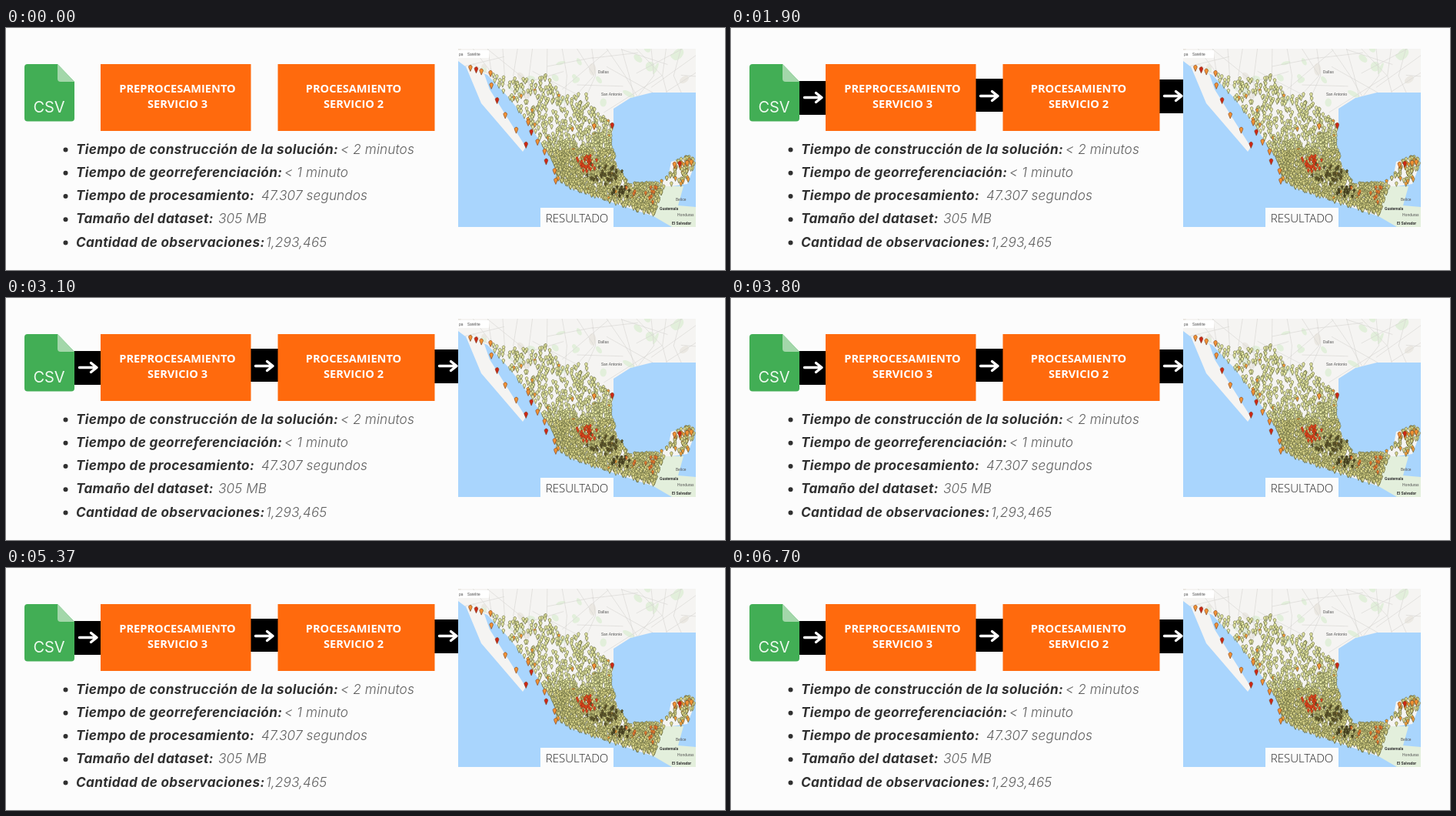
Write an HTML page with a canvas that moves like this. It is 935 px wide and 315 px high and loops after 6.86 s.

```html
<!DOCTYPE html>
<html lang="es">
<head>
<meta charset="utf-8">
<style>
  html, body { margin: 0; width: 100%; height: 100%; overflow: hidden; background: #fcfcfc; }
  canvas { position: absolute; left: 588px; top: 27px; }
  svg { position: absolute; left: 0; top: 0; }
  .box { fill: #ff6a0d; }
  .step { font: 700 14.6px "Open Sans", sans-serif; fill: #fff; text-anchor: middle; }
  .key { font: italic 700 17.2px Inter, sans-serif; letter-spacing: .3px; fill: #303030; }
  .value { font: italic 300 17.2px Inter, sans-serif; letter-spacing: .1px; fill: #606060; }
  .csv { font: 400 20px Inter, sans-serif; fill: #effaf0; text-anchor: middle; }
  .result { font: 300 15px "Open Sans", sans-serif; fill: #222; text-anchor: middle; }
  .head { fill: none; stroke: #fff; stroke-width: 3.4; stroke-linecap: round; stroke-linejoin: round; }
  .arrows { animation: reveal 6860ms step-end infinite; }
  @keyframes reveal { 0% { visibility: hidden; } 1.0204%, 100% { visibility: visible; } }
</style>
</head>
<body>
<canvas id="map" width="309" height="232"></canvas>
<svg width="935" height="315" viewBox="0 0 935 315">
  <defs><path id="arrow" class="head" d="M1 0H23.500M16-6 23.500 0 16 6"/></defs>

  <g class="arrows">
    <path d="M88 69h36v44H88zM318 66h37v43h-37zM557 67h31v44h-31z"/>
    <use href="#arrow" x="94.500" y="90.500"/>
    <use href="#arrow" x="323.500" y="88.500"/>
    <use href="#arrow" x="562.500" y="88.500"/>
  </g>

  <path d="M28 47H67L89 70V117.500Q89 121.500 85 121.500H28Q24 121.500 24 117.500V51Q24 47 28 47Z" fill="#42ae55"/>
  <path d="M67 47 89 70H71Q67 70 67 66Z" fill="#a3d7aa"/>
  <text class="csv" x="56" y="110">CSV</text>

  <path class="box" d="M123 47h195.500v87H123zM353.500 47h204v87h-204z"/>
  <g class="step">
    <text x="223" y="84">PREPROCESAMIENTO</text>
    <text x="223" y="104">SERVICIO 3</text>
    <text x="452" y="84">PROCESAMIENTO</text>
    <text x="452" y="104">SERVICIO 2</text>
  </g>

  <g id="facts"></g>

  <path d="M695 234h95v26h-95z" fill="#fcfcfc"/>
  <text class="result" x="742.500" y="253">RESULTADO</text>
</svg>
<script>
const facts = [
  ['Tiempo de construcción de la solución:', '&lt; 2 minutos', 435],
  ['Tiempo de georreferenciación:', '&lt; 1 minuto', 362],
  ['Tiempo de procesamiento:', '47.307 segundos', 332],
  ['Tamaño del dataset:', '305 MB', 276],
  ['Cantidad de observaciones:', '1,293,465', 338],
];
document.getElementById('facts').innerHTML = facts.map(([key, value, x], i) => {
  const y = 163.5 + i * 30.25;
  return `<circle cx="77.5" cy="${y - 5}" r="3" fill="#303030"/>
    <text class="key" x="91" y="${y}">${key}</text>
    <text class="value" x="${x}" y="${y}">${value}</text>`;
}).join('');

const left = 588, top_ = 27, right = 897, bottom = 259;
const ctx = document.getElementById('map').getContext('2d');
ctx.translate(-left, -top_);

let seed = 11;
const random = () => (seed = seed * 16807 % 2147483647) / 2147483647;
const between = (a, b) => a + random() * (b - a);
const near = spread => (random() + random() + random() - 1.5) * spread;

// Coarse outlines of each land area
const north = new Path2D('M588 27H897V84H840L812 91 790 105V125L700 110 626 61 600 52 588 43Z');
const baja = new Path2D('M598 50 622 60 629 80 649 112 676 155 672 161 642 126 618 98Z');
const mainland = new Path2D(`M626 61 668 66 704 62 724 91 752 84 770 112 790 126 786 150
  797 187 811 203 847 203 853 213 842 245 800 231 735 209 717 196 713 176 681 127 656 93Z`);
const yucatan = new Path2D('M847 203 861 195 865 174 893 167 896 177 886 203 852 208Z');
const south = new Path2D('M852 206H881L874 231 897 233V259H866L842 245Z');

function fill(path, color) {
  ctx.fillStyle = color;
  ctx.fill(path);
}

function label(text, x, y, color = '#555', weight = 400) {
  ctx.font = `${weight} 5px Roboto, sans-serif`;
  ctx.fillStyle = color;
  ctx.fillText(text, x, y);
}

function drawTerrain(area, patches, roads) {
  ctx.save();
  ctx.clip(area);
  for (let i = 0; i < patches; i++) {
    ctx.fillStyle = i % 3 ? '#e2efdb' : '#ebe8e2';
    ctx.beginPath();
    ctx.ellipse(between(left, right), between(top_, 100), between(2, 9), between(2, 6), random() * 3, 0, 7);
    ctx.fill();
  }
  ctx.strokeStyle = '#d6d4d1';
  ctx.lineWidth = .6;
  for (let i = 0; i < roads; i++) {
    const x = left + i * (right - left) / roads;
    ctx.beginPath();
    ctx.moveTo(x, top_);
    ctx.lineTo(x + near(30), 62);
    ctx.lineTo(x + near(60), 110);
    ctx.moveTo(x, between(top_, 90));
    ctx.lineTo(x + 60, between(top_, 90));
    ctx.stroke();
  }
  ctx.restore();
}

function drawBase() {
  ctx.fillStyle = '#a9d5fd';
  ctx.fillRect(left, top_, right - left, bottom - top_);
  for (const area of [north, baja, mainland, yucatan]) fill(area, '#f5f4f2');
  fill(south, '#e3efdc');
  drawTerrain(north, 30, 16);
  ctx.fillStyle = '#fff';
  ctx.fillRect(left, 29, 40, 10);
  label('pa', 589, 36);
  label('Satélite', 600, 36);
  label('Dallas', 770, 59);
  label('San Antonio', 774, 88);
  label('Belice', 871, 225);
  label('Guatemala', 850, 237, '#333', 700);
  label('Honduras', 873, 245);
  label('El Salvador', 866, 256, '#333', 700);
}

function pin(x, y, color, r = 1.8) {
  ctx.beginPath();
  ctx.arc(x, y - r, r, 2.6, 6.82);
  ctx.lineTo(x, y + r * 1.5);
  ctx.closePath();
  ctx.fillStyle = color;
  ctx.fill();
  ctx.stroke();
}

// Pins crowd towards the south and the eastern coast
const density = (x, y) => .24 + Math.max(0, (y - 135) / 45) + Math.max(0, (x - 750) / 110);

function drawPins() {
  const inside = (area, x, y) => ctx.isPointInPath(area, x - left, y - top_);
  const pins = [];
  for (let i = 0; i < 8800; i++) {
    const x = between(600, right), y = between(58, 250);
    const east = inside(yucatan, x, y);
    const chance = east ? (185 / y) ** 8 * .5 : inside(mainland, x, y) ? density(x, y) : 0;
    if (random() > chance) continue;
    const hot = random() < (east ? .3 : .02);
    pins.push({ x, y, color: hot ? '#f49b38' : y > 160 ? '#dad58a' : '#e5e7a4' });
  }
  pins.sort((a, b) => a.y - b.y);
  ctx.lineWidth = .6;
  ctx.strokeStyle = '#5c5f34';
  for (const { x, y, color } of pins) pin(x, y, color);
}

function cluster(x, y, count, spread, color) {
  for (let i = 0; i < count; i++) pin(x + near(spread), y + near(spread * .6), color, 1.4);
}

function trail(x1, y1, x2, y2, count) {
  for (let i = 0; i < count; i++) {
    const t = i / (count - 1);
    pin(x1 + (x2 - x1) * t + near(4), y1 + (y2 - y1) * t, i % 3 === 1 ? '#cf2716' : '#f29335', 2.3);
  }
}

function drawHighlights() {
  ctx.strokeStyle = '#3a361d';
  cluster(782, 191, 34, 20, '#655b2c');
  cluster(800, 212, 16, 12, '#4c4521');
  ctx.strokeStyle = '#9b2e12';
  cluster(756, 177, 34, 14, '#e64a20');
  cluster(830, 213, 12, 26, '#e98b34');
  ctx.strokeStyle = '#7b3b18';
  trail(602, 53, 628, 60, 4);
  trail(630, 76, 673, 153, 5);
  trail(678, 124, 718, 200, 7);
  trail(766, 129, 790, 128, 2);
  trail(866, 179, 893, 176, 4);
}

drawBase();
drawPins();
drawHighlights();
</script>
</body>
</html>
```
